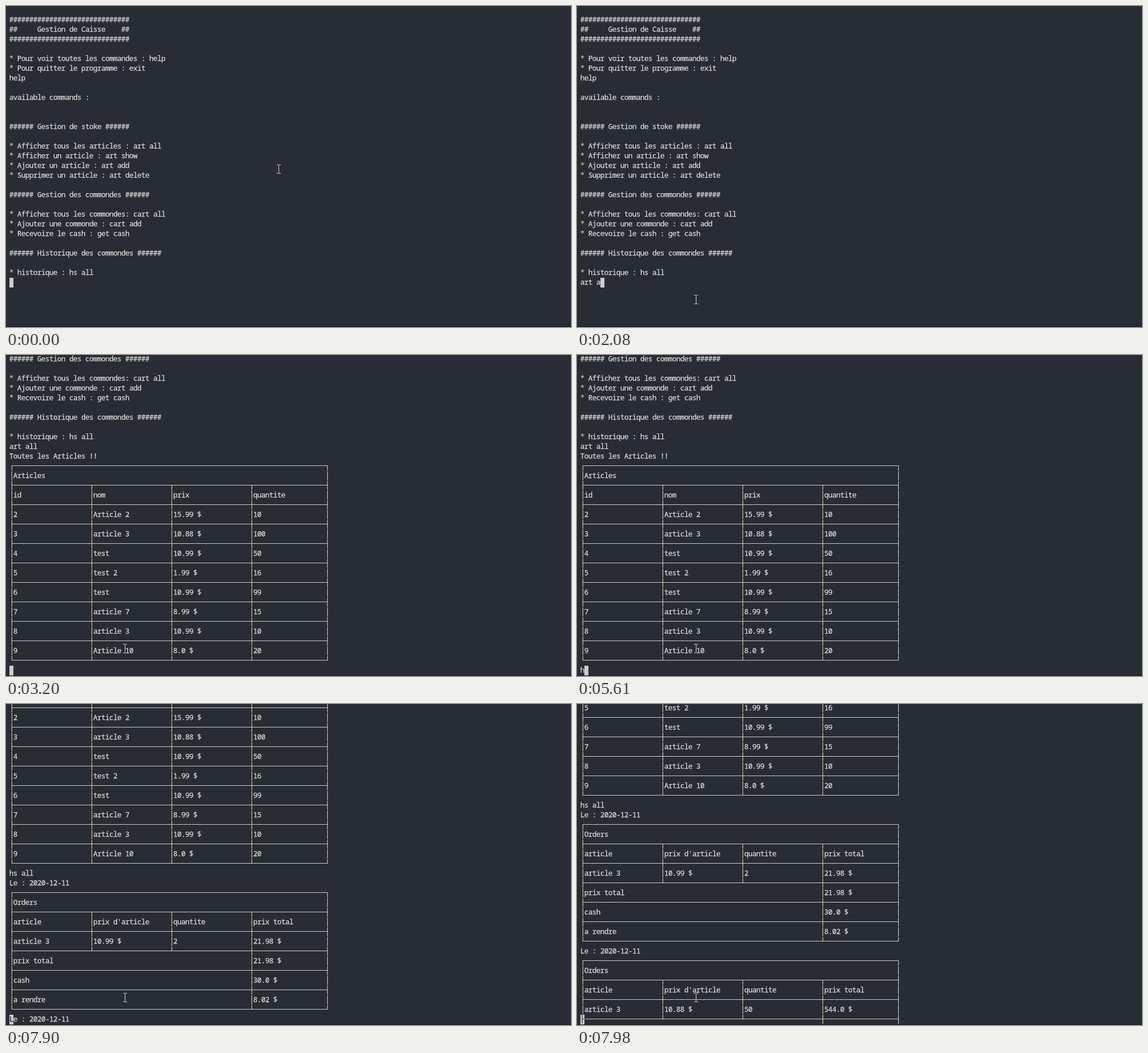
Recreate the animation shown at these times as an HTML page. Size 989 px wide and 561 px high, loop 8 s.

```html
<!DOCTYPE html>
<html lang="fr">
<head>
<meta charset="utf-8">
<title>Gestion de Caisse</title>
<style>
  html, body { margin: 0; width: 100%; height: 100%; overflow: hidden; background: #282c34; }
  svg { display: block; }
  rect { shape-rendering: crispEdges; }
  text {
    font: 12.5px "Noto Sans Mono", monospace; letter-spacing: -.5px; white-space: pre;
    fill: #dcdcdc; stroke: #dcdcdc; stroke-width: .25px;
  }
  .star { fill: #dcc48e; stroke: #dcc48e; }
  .line { fill: #cbcbc6; }
  .barA { fill: #4b5a69; }
  .barB { fill: #cfb476; }
  .endA { fill: #9dbccd; }
  .endB { fill: #5d5448; }
  .block { fill: #cccccc; }
  .inverse { fill: #282c34; stroke: #282c34; }
  .edge { fill: #181a1f; }
  .click { fill: #ffff00; fill-opacity: .47; }
  .beam { fill: #d8d8d8; }
</style>
</head>
<body>
<svg id="stage" width="989" height="561" viewBox="0 0 989 561"></svg>
<script>
const LOOP = 8000, CELL = 7, ROW = 17, LEFT = 6;
const stage = document.getElementById('stage');

function add(parent, tag, attrs, content) {
  const node = document.createElementNS('http://www.w3.org/2000/svg', tag);
  for (const key in attrs) node.setAttribute(key, attrs[key]);
  if (content) node.textContent = content;
  return parent.appendChild(node);
}
const rect = (parent, cls, x, y, width, height) =>
  add(parent, 'rect', { class: cls, x, y, width, height });
const write = (parent, col, str, cls = '') =>
  add(parent, 'text', { class: cls, x: LEFT - .25 + col * CELL, y: 12 }, str);

const screen = add(stage, 'g', {});
const rows = [];

function newRow() {
  const g = add(screen, 'g', { transform: `translate(0 ${rows.length * ROW - 1})` });
  rows.push(g);
  return g;
}

function print(str) {
  for (const line of str.split('\n')) {
    const g = newRow();
    if (line[0] === '*') {
      write(g, 0, '*', 'star');
      write(g, 2, line.slice(2));
    } else if (line) write(g, 0, line);
  }
}

const prompt = () => write(newRow(), 0, '');

// Column borders by number of cells in a row
const LAST = 79;
const BORDERS = { 0: [], 1: [0, LAST], 2: [0, 60, LAST], 4: [0, 20, 40, 60, LAST] };

function bar(g, col, y, h) {
  const x = LEFT + col * CELL + 3, kind = col === LAST ? 'end' : 'bar';
  rect(g, kind + 'A', x, y, 1, h);
  rect(g, kind + 'B', x + 1, y, 1, h);
}

function rule(above, below) {
  const g = newRow();
  BORDERS[above].forEach(col => bar(g, col, 0, 8));
  BORDERS[below].forEach(col => bar(g, col, 7, 9));
  rect(g, 'line', LEFT + 4, 7, LAST * CELL, 1);
}

function table(lines) {
  let above = 0;
  for (const line of lines) {
    const cells = line.split('|');
    rule(above, cells.length);
    const g = newRow();
    BORDERS[cells.length].forEach((col, i) => {
      bar(g, col, 0, 16);
      if (cells[i]) write(g, col + 1, cells[i]);
    });
    above = cells.length;
  }
  rule(above, 0);
}

function order(item, total, ...rest) {
  print('Le : 2020-12-11');
  table(['Orders', "article|prix d'article|quantite|prix total",
    item + '|' + total, 'prix total|' + total, ...rest]);
}

const hashes = '#'.repeat(30);
print(`
${hashes}
##     Gestion de Caisse    ##
${hashes}

* Pour voir toutes les commandes : help
* Pour quitter le programme : exit
help

available commands :


###### Gestion de stoke ######

* Afficher tous les articles : art all
* Afficher un article : art show
* Ajouter un article : art add
* Supprimer un article : art delete

###### Gestion des commondes ######

* Afficher tous les commondes: cart all
* Ajouter une commonde : cart add
* Recevoire le cash : get cash

###### Historique des commondes ######

* historique : hs all`);
const artCmd = prompt();
print('Toutes les Articles !!');
table(['Articles', 'id|nom|prix|quantite',
  '2|Article 2|15.99 $|10', '3|article 3|10.88 $|100',
  '4|test|10.99 $|50', '5|test 2|1.99 $|16',
  '6|test|10.99 $|99', '7|article 7|8.99 $|15',
  '8|article 3|10.99 $|10', '9|Article 10|8.0 $|20']);
const hsCmd = prompt();
order('article 3|10.99 $|2', '21.98 $', 'cash|30.0 $', 'a rendre|8.02 $');
order('article 3|10.88 $|50', '544.0 $');

// Text cursor
const block = add(stage, 'g', {});
rect(block, 'block', LEFT, 0, CELL, ROW);
const under = write(block, 0, '', 'inverse');

rect(stage, 'edge', 0, 560, 989, 1);

// Mouse pointer
const click = add(stage, 'circle', { class: 'click', cx: 206, cy: 512, r: 12 });
const beam = add(stage, 'g', {});
rect(beam, 'beam', 0, -7, 1, 14);
for (const y of [-8, 7]) for (const x of [-3, 1]) rect(beam, 'beam', x, y, 3, 1);

// start time, first row on screen, cursor row, printed rows, character under the cursor
const states = [
  [0, 0, 28, 29, ''],
  [2970, 0, 30, 30, ''],
  [3200, 19, 51, 52, ''],
  [7900, 34, 66, 67, 'L'],
  [7930, 37, 69, 70, '├'],
  [7980, 41, 73, 74, '├']
];
const typing = [
  { node: artCmd, str: 'art all', keys: [1430, 1530, 1670, 1810, 2080, 2280, 2410], enter: 2970 },
  { node: hsCmd, str: 'hs all', keys: [5610, 5700, 5850, 6210, 6500, 7190], enter: 7900 }
];

function pointerAt(t) {
  const i = t < 320 ? 0 : Math.min(12, Math.floor((t - 320) / 46.36) + 1);
  const s = Math.min(1, i / 10), e = s * s * (3 - 2 * s);
  const over = i === 11 ? 1 : 0;
  return [Math.round(477 - 269 * e) - over, Math.round(285 + 228 * e) + 2 * over];
}

function draw(t) {
  const [, first, cursorRow, printed, char] = states.filter(s => s[0] <= t).pop();
  screen.setAttribute('transform', `translate(0 ${-first * ROW})`);
  rows.forEach((g, i) => g.style.display = i >= first && i < printed ? '' : 'none');

  let col = 0;
  for (const { node, str, keys, enter } of typing) {
    const n = keys.filter(k => k <= t).length;
    node.textContent = str.slice(0, n);
    if (t < enter) col = Math.max(col, n);
  }
  block.setAttribute('transform', `translate(${col * CELL} ${(cursorRow - first) * ROW - 1})`);
  under.textContent = char;

  click.style.display = t >= 1100 && t < 1240 ? '' : 'none';
  beam.setAttribute('transform', `translate(${pointerAt(t)})`);
}

const start = performance.now();
function tick() {
  draw((performance.now() - start) % LOOP);
  requestAnimationFrame(tick);
}
tick();
</script>
</body>
</html>
```
